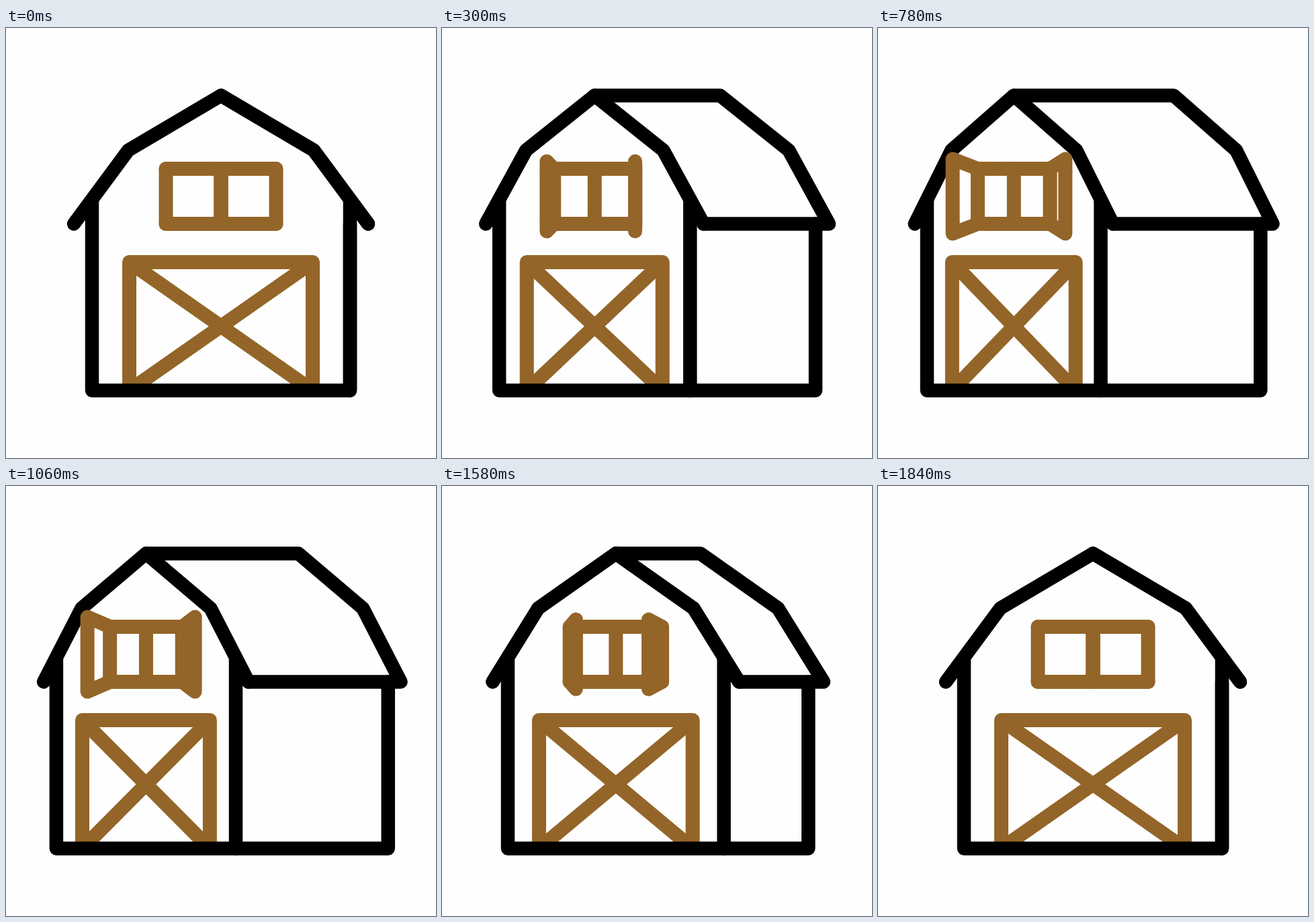
An HTML page with a canvas for the animation above (2.4 s loop, 640 by 640 pixels).

```html
<!DOCTYPE html>
<html lang="en">
<head>
<meta charset="utf-8">
<title>Barn</title>
<style>
html, body { margin: 0; width: 100%; height: 100%; overflow: hidden; background: #fefefe; }
canvas { display: block; }
</style>
</head>
<body>
<canvas id="stage" width="640" height="640"></canvas>
<script>
const ctx = document.getElementById('stage').getContext('2d');
const LOOP = 2400, STEP = 20;
const TURNED = 440, END = 1840;
const BLACK = '#000', BROWN = '#936528';

const clamp = u => Math.min(1, Math.max(0, u));
const smooth = u => u * u * (3 - 2 * u);
const mix = (a, b, u) => a + (b - a) * u;

// Turn to a side view, drift slowly until `leave`, then turn back
function swing(t, leave, rest, turned, drifted = turned) {
  if (t < TURNED) return mix(rest, turned, smooth(t / TURNED));
  if (t < leave) return mix(turned, drifted, ((t - TURNED) / (leave - TURNED)) ** 1.5);
  return mix(drifted, rest, smooth(clamp((t - leave) / (END - leave))));
}

function line(color, points, closed) {
  ctx.strokeStyle = color;
  ctx.beginPath();
  points.forEach(([x, y]) => ctx.lineTo(x, y));
  if (closed) ctx.closePath();
  ctx.stroke();
}

function draw(t) {
  const body = (...keys) => swing(t, 1380, ...keys);
  const shutter = (...keys) => swing(t, 1450, ...keys);

  const scale = body(1, .658, .728);
  const mid = 320 - body(0, 122, 102.5);
  const backMid = 320 + body(0, 123.5, 108);
  const front = x => mid + x * scale;
  const back = x => backMid + x * scale;

  const hinge = swing(t, 1300, 82, 53.8);
  const reach = shutter(0, 86.5, 73);
  const flare = shutter(0, 14.5);
  const skew = shutter(0, 7.3);

  const ridge = 100.5, knee = 182, eave = 291.5, floor = 539.5;
  const top = 209.5, bottom = eave, lintel = 348.5;

  ctx.fillStyle = '#fefefe';
  ctx.fillRect(0, 0, 640, 640);
  ctx.lineJoin = 'round';

  // Door
  const left = front(-136.5), right = front(136.5);
  ctx.lineWidth = 21;
  ctx.lineCap = 'butt';
  line(BROWN, [[left, floor], [left, lintel], [right, lintel], [right, floor]]);
  line(BROWN, [[left, lintel], [right, floor]]);
  line(BROWN, [[right, lintel], [left, floor]]);

  // Walls and roof
  ctx.lineWidth = 20.5;
  ctx.lineCap = 'round';
  line(BLACK, [[front(-192), 256], [front(-192), floor], [back(192), floor], [back(192), eave]]);
  line(BLACK, [[front(192), 256], [front(192), floor]]);
  line(BLACK, [[front(-219), eave], [front(-138), knee], [mid, ridge], [front(138), knee], [front(219), eave]]);
  line(BLACK, [[mid, ridge], [backMid, ridge], [back(138), knee], [back(219), eave], [front(219), eave]]);

  // Window and shutters
  ctx.lineWidth = 21;
  line(BROWN, [[mid, top], [mid, bottom]]);
  for (const side of [-1, 1]) {
    const fixed = mid + side * hinge;
    const free = mid + side * reach - skew;
    line(BROWN, [[mid, top], [fixed, top], [fixed, bottom], [mid, bottom]]);
    line(BROWN, [[fixed, top], [free, top - flare], [free, bottom + flare], [fixed, bottom]]);
  }
}

const start = performance.now();
function tick() {
  const t = (performance.now() - start) % LOOP;
  draw(Math.floor(t / STEP) * STEP);
  requestAnimationFrame(tick);
}
tick();
</script>
</body>
</html>
```
